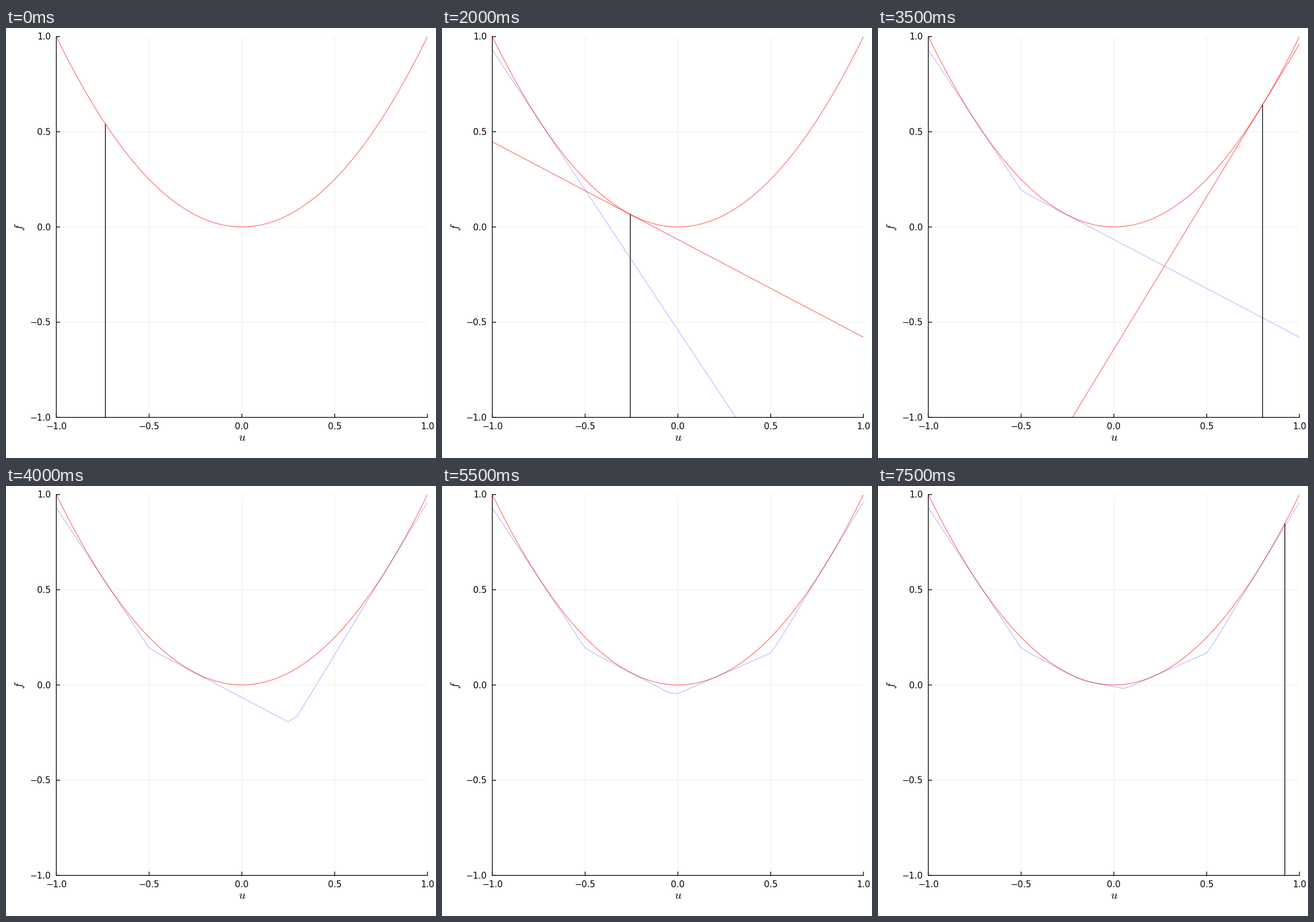
A matplotlib script for the animation above (8 s loop, 748 by 748 pixels).

```python
import numpy as np
import matplotlib.pyplot as plt
from matplotlib.animation import FuncAnimation
from matplotlib.patches import Rectangle

plt.rcParams["font.family"] = "DejaVu Sans"
plt.rcParams["mathtext.fontset"] = "cm"

SIZE, DPI = 748, 100
LEFT, RIGHT, TOP, BOTTOM = 87.5, 733.2, 14.9, 677.4
PT = 72 / DPI  # points per pixel
LINE = 1.3

POINTS = [-0.7355, -0.2566, 0.801, 0.2134, -0.095, 0.921]
TICKS = [-1.0, -0.5, 0.0, 0.5, 1.0]
GRID = np.linspace(-1, 1, 41)


def px(u):
    return LEFT + (np.asarray(u) + 1) / 2 * (RIGHT - LEFT)


def py(f):
    return BOTTOM - (np.asarray(f) + 1) / 2 * (BOTTOM - TOP)


def tangent(p):
    return p * p + 2 * p * (GRID - p)


fig = plt.figure(figsize=(SIZE / DPI, SIZE / DPI), dpi=DPI, facecolor="white")
ax = fig.add_axes([0, 0, 1, 1])
ax.set(xlim=(0, SIZE), ylim=(SIZE, 0))
ax.axis("off")
area = Rectangle((LEFT, TOP), RIGHT - LEFT, BOTTOM - TOP, transform=ax.transData)


def draw(x, y, color="black", width=LINE, alpha=1.0, z=2, clip=True, cap="butt"):
    line, = ax.plot(x, y, color=color, lw=width * PT, alpha=alpha, zorder=z,
                    solid_capstyle=cap, snap=False)
    if clip:
        line.set_clip_path(area)
    return line


def label(x, y, text, size, ha="center", **kw):
    ax.text(x, y, text, fontsize=size * PT, ha=ha, va="baseline", **kw)


# Grid, ticks and tick labels
for t in TICKS:
    x, y = float(px(t)), float(py(t))
    draw([x, x], [TOP, BOTTOM], width=0.65, alpha=0.1, z=1)
    draw([LEFT, RIGHT], [y, y], width=0.65, alpha=0.1, z=1)
    draw([x, x], [BOTTOM, BOTTOM - 6.5], z=6, clip=False)
    draw([LEFT, LEFT + 6.5], [y, y], z=6, clip=False)
    name = f"{t:.1f}".replace("-", "\u2212")
    label(x, 697.5, name, 15.1)
    label(78, y + 5.5, name, 15.1, ha="right")

draw([LEFT, LEFT, RIGHT], [TOP, BOTTOM, BOTTOM], z=6, clip=False, cap="projecting")
label(410.3, 718.4, "$u$", 20.7)
label(28.7, 346.2, "$f$", 20.7, rotation=90, rotation_mode="anchor")

# Curve, lower envelope of tangents, current tangent and its point
draw(px(GRID), py(GRID**2), "red", alpha=0.54, z=2)
envelope = draw([], [], "blue", alpha=0.25, z=3)
cut = draw([], [], "red", alpha=0.54, z=4)
marker = draw([], [], z=5)


def update(i):
    step, phase = divmod(i, 3)
    p = POINTS[step]
    known = POINTS[:step + (phase == 2)]

    if known:
        best = np.max([tangent(q) for q in known], axis=0)
        envelope.set_data(px(GRID), py(best))
    else:
        envelope.set_data([], [])

    if phase == 1:
        cut.set_data(px(GRID), py(tangent(p)))
    else:
        cut.set_data([], [])

    if phase < 2:
        marker.set_data(px([p, p]), py([-1, p * p]))
    else:
        marker.set_data([], [])
    return envelope, cut, marker


anim = FuncAnimation(fig, update, frames=16, interval=500, repeat=True,
                     repeat_delay=0, blit=False)
plt.show()
```
